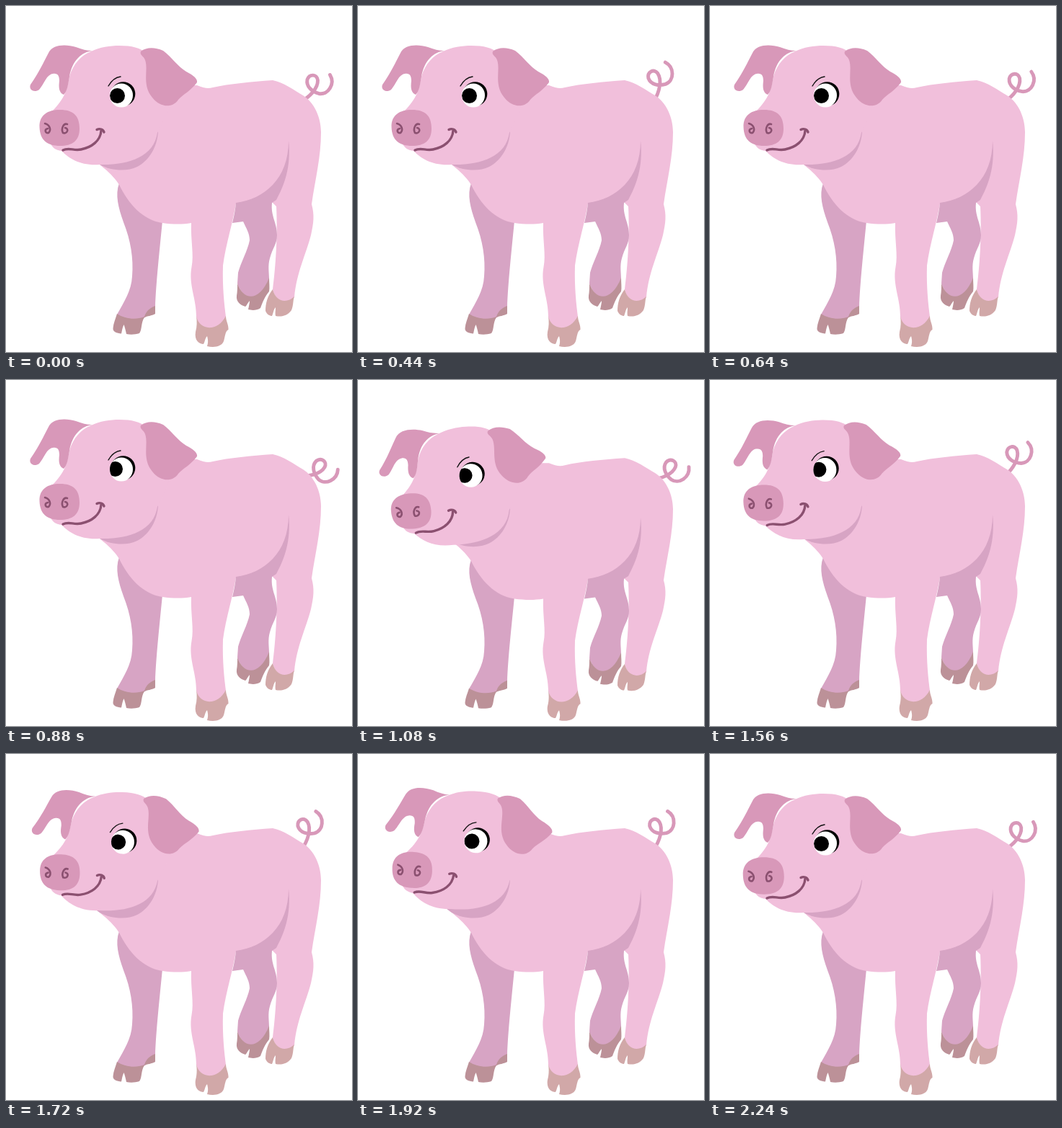
Write an HTML page that moves like this. It is 480x480 px and loops after 2280 ms.

```html
<!DOCTYPE html>
<html lang="en">
<head>
<meta charset="utf-8">
<title>Pig</title>
<style>
  html, body { margin: 0; width: 100%; height: 100%; overflow: hidden; background: #fff; }
  svg { display: block; width: 100%; height: 100%; }
  .skin { fill: #f1bfdb; }
  .shade { fill: #d7a4c4; }
  .dark { fill: #d898b9; }
  .hoof { fill: #d1a8a8; }
  .far-hoof { fill: #bc9198; }
  .line { fill: none; stroke: #8b5070; stroke-linecap: round; stroke-linejoin: round; }
</style>
</head>
<body>
<svg viewBox="0 0 480 480">
  <defs>
    <clipPath id="eyeClip"><ellipse cx="160" cy="124" rx="16" ry="16.500"/></clipPath>
  </defs>
  <g id="pig">
    <path id="tail" fill="none" stroke="#d898b9" stroke-width="4.900" stroke-linecap="round"
      d="M407 134C422 126 433 114 432.500 103C431.500 94 421 94 418 102C416 112 425 119 434 121.500C447 124 457 108 449.500 95.500"/>

    <!-- far front leg -->
    <path class="shade" d="M157 246C151 262 156 280 163 300C173 325 177 350 175 375C174 395 164 410 154 428C165 436 180 436 193 432L207 418C208 385 213 340 217 298Z"/>
    <path class="far-hoof" d="M154 427C165 434 180 436 192 431C194 425 197 420 207 416L207 427C202 430 196 430 192 432C187 439 189 449 185 454C179 456 172 456 167 455C166 450 165 446 163.500 442C161.500 446 161 450 160 454.500C154 454 148 452 148.500 447C149 440 152 434 154 427Z"/>

    <!-- trunk, near front leg and near hind leg -->
    <path class="skin" d="M100 198C130 219 147 232 157 248C170 275 190 297 217 301C232 303 245 303 257 301C256 325 261 345 257.500 362C253 387 264 405 264 431C268 452 294 453 305 431C303 415 300 390 301 360C305 330 315 300 319 274L369 272L375 278C377 320 374 362 370 393C374 412 390 414 400 404C403 370 416 345 423 318C427 300 428 290 424 275C429 240 437 210 437 175C437 155 428 134 412 124C400 117 385 106 370 103C340 105 310 108 287 113C280 115 275 114 265 110L200 110Z"/>

    <!-- belly shade and far hind leg -->
    <path class="shade" d="M392 187C392 240 358 268 319 273Q318 285 314 301L329 299C333 308 338 315 338 325C335 340 326 355 322 370L321 385C330 411 352 411 365 378C365 370 363 360 366 350C370 335 376 330 376 318C376 300 367 292 369 273L375 269C385 250 396 225 392 187Z"/>
    <path class="far-hoof" d="M321 385C330 410 352 410 365 377C365 384 366 391 365 396C359 403 356 411 353 419C347 423 340 422 336 421C337 416 338 412 338 409C335 412 334 416 332 417C325 415 319 410 320 402C321 396 321 391 321 385Z"/>

    <path class="hoof" d="M370 393C374 411 390 413 400 403C398 408 399 415 396 422C391 429 383 432 374 430C373 427 374 423 374 418C371 421 371 426 369 430C366 430 362 428 360 423C360 412 363 402 370 393Z"/>
    <path class="hoof" d="M264 430C268 451 294 452 305 430C305 437 309 442 308.500 449C304 451 304 459 302 465C299 473 288 474 279 472C281 466 280 462 279 458C276 461 276 466 274 469C268 469 261 464 263 452C265 445 265 437 264 430Z"/>

    <!-- neck shade -->
    <path class="shade" d="M211 174C210 195 199 214 182 223C168 230 146 229 130 220L100 198L160 180Z"/>

    <g id="head">
      <path class="skin" d="M88 98C93 80 105 68 118 63C130 57 145 55 157 55C175 55 186 58 194 65L235 110C228 135 222 155 210 176C205 210 168 221 130 220C104 222 88 212 77 201C69 200 63 196 62 190L64 146C82 128 85 115 88 98Z"/>
      <path class="dark" d="M120 62C105 64 92 75 88 98C86 110 85 118 80 123C73 120 73 112 74 104C74 97 72 93 65 94C56 95 52 110 46 116C39 121 31 116 34 109C46 92 52 78 59 65C65 53 83 53 97 57C105 60 112 62 120 62Z"/>
      <path class="dark" d="M187 63C195 57 206 57 218 62C230 71 238 84 250 91C260 96 266 101 265 106C255 119 246 122 239 130C231 142 214 141 203 127C188 109 198 89 193 75C191 69 185 68 187 63Z"/>

      <circle cx="162.500" cy="122" r="16.800"/>
      <ellipse cx="160" cy="124" rx="16" ry="16.500" fill="#fff"/>
      <g clip-path="url(#eyeClip)"><circle id="pupil" cx="154.500" cy="124.500" r="10.500"/></g>
      <path d="M142 111C146 104 151 99 159 98" fill="none" stroke="#111" stroke-width="1.400" stroke-linecap="round"/>

      <path class="line" stroke-width="3.400" d="M79 200C87 196 94 201 104 199C119 196 131 187 132 173M126 171.500C130 169.500 135 171 136 175"/>
      <g id="snout">
        <path class="dark" d="M46.500 168C46 151 58 144 75 144C93 144 102 152 102 170C102 187 92 194 75 194C57 194 47 186 46.500 168Z"/>
        <path class="line" stroke-width="2.600" d="M54 163C61 165 63 172 59 176C54 177 53 171 58 170M85 164C80 162 76 170 79 176C85 178 88 170 82 169"/>
      </g>
    </g>
  </g>
</svg>
<script>
  const LOOP = 2280;
  const BEAT = LOOP / 5;
  const GROUND = 470;
  const part = id => document.getElementById(id);
  const pig = part("pig"), tail = part("tail"), head = part("head"), pupil = part("pupil"), snout = part("snout");

  // Keys are [time, value] pairs.
  const squash = [[900, 1], [1210, 0.976], [1560, 1]];
  const tailTurn = [[0, 0], [BEAT, -32], [2 * BEAT, 36], [3 * BEAT, 0], [4 * BEAT, -33], [LOOP, 0]];
  const headTurn = [[900, 0], [1200, -5.5], [1880, 3.6], [2220, 0]];
  const gaze = [[640, 0], [820, -3], [1560, -3], [1800, 0]];
  const sniff = [[2040, 1], [2220, 1.04], [LOOP, 1]];

  // Halfway between linear and sine easing.
  const ease = p => (p + (1 - Math.cos(Math.PI * p)) / 2) / 2;

  function at(keys, t) {
    const next = keys.findIndex(([time]) => time > t);
    if (next === 0) return keys[0][1];
    if (next < 0) return keys[keys.length - 1][1];
    const [t0, a] = keys[next - 1], [t1, b] = keys[next];
    return a + (b - a) * ease((t - t0) / (t1 - t0));
  }

  function draw(t) {
    pig.setAttribute("transform", `translate(0 ${GROUND}) scale(1 ${at(squash, t)}) translate(0 ${-GROUND})`);
    tail.setAttribute("transform", `rotate(${at(tailTurn, t)} 407 128)`);
    head.setAttribute("transform", `rotate(${at(headTurn, t)} 216 182)`);
    pupil.setAttribute("transform", `translate(${at(gaze, t)} ${at(gaze, t) / 3})`);
    snout.setAttribute("transform", `translate(74 169) scale(${at(sniff, t)}) translate(-74 -169)`);
  }

  const start = performance.now();
  function tick() {
    draw((performance.now() - start) % LOOP);
    requestAnimationFrame(tick);
  }
  tick();
</script>
</body>
</html>
```
